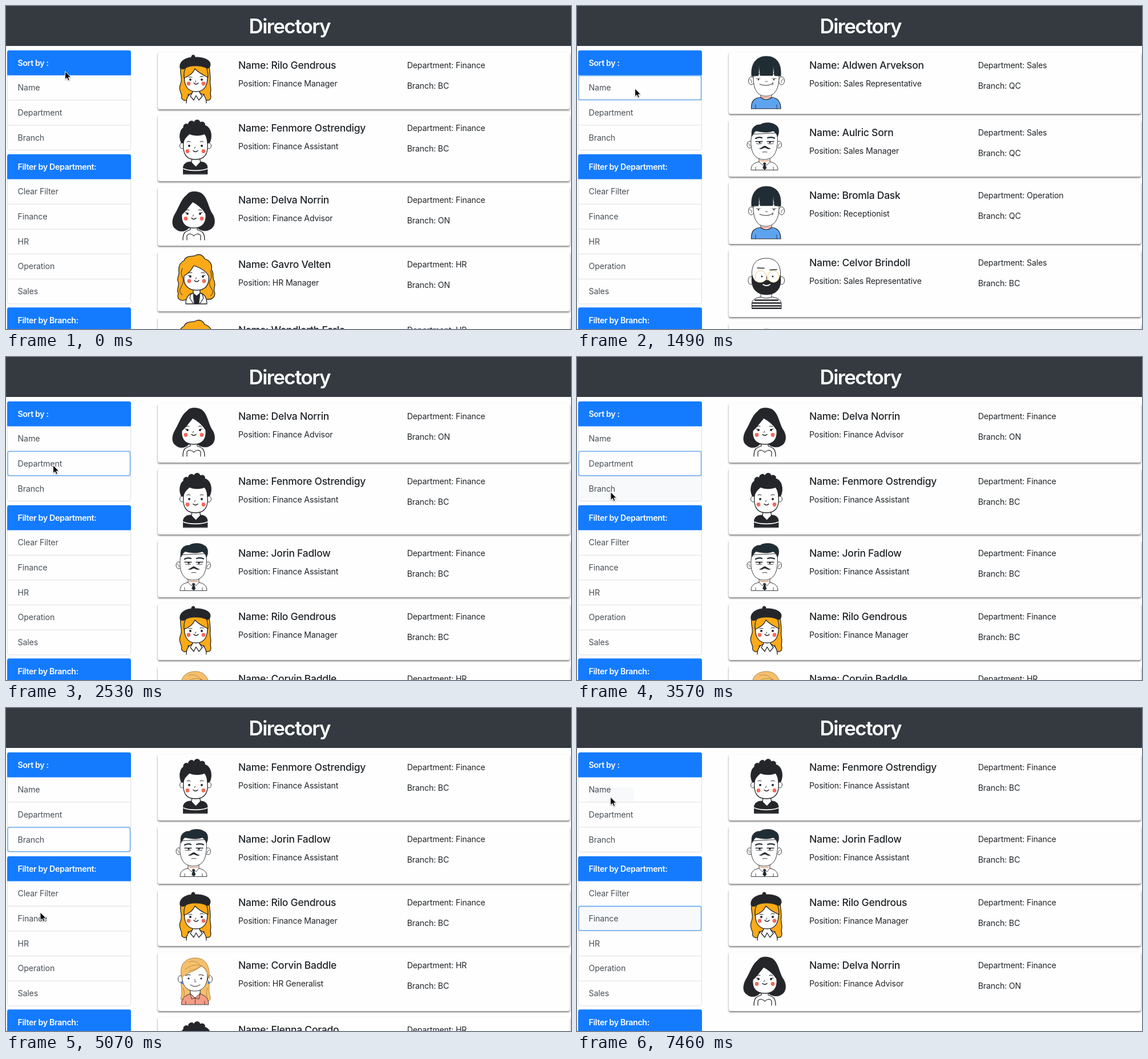
Recreate the animation shown at these times as an HTML page. Size 990 by 566 pixels, loop 8 s.

```html
<!DOCTYPE html>
<html lang="en">
<head>
<meta charset="utf-8">
<title>Directory</title>
<style>
html, body { margin: 0; width: 100%; height: 100%; overflow: hidden; background: #fff; }
#stage { position: relative; width: 990px; height: 566px; overflow: hidden; background: #fefefe; }
#stage > svg, .view { position: absolute; left: 0; top: 0; width: 990px; height: 566px; }
.view { visibility: hidden; }
.card { position: absolute; left: 266px; width: 721.5px; border-radius: 3.6px; background: #fefefe;
  box-shadow: 0 2px 3px rgba(0, 0, 0, .5); }
.card svg { position: absolute; left: 24px; top: 0; width: 690px; height: 120px; overflow: visible; }
text { font: 400 14.2px Inter, Roboto, sans-serif; letter-spacing: -.17px; fill: #212529; }
.name { font-size: 17.6px; font-weight: 500; letter-spacing: -.3px; }
.title { font-size: 35px; font-weight: 600; letter-spacing: -1.6px; fill: #fff; }
.item { fill: #495057; }
.head { fill: #fff; font-weight: 600; letter-spacing: -.33px; }
</style>
</head>
<body>
<div id="stage">
  <div id="views"></div>
  <svg id="chrome" viewBox="0 0 990 566"></svg>
</div>
<script>
const INK = '#25262a', SLATE = '#212d34', GOLD = '#fcaa17', BLUSH = '#f26b5c';
const shape = (d, fill = '#fff', width = 1.3, stroke = INK) =>
  `<path d="${d}" fill="${fill}" stroke="${stroke}" stroke-width="${width}" stroke-linejoin="round" stroke-linecap="round"/>`;
const line = (d, width = 1.2, stroke = INK) => shape(d, 'none', width, stroke);
const dot = (x, y, r, fill = INK) => `<circle cx="${x}" cy="${y}" r="${r}" fill="${fill}"/>`;
const ear = (x, y, rx = 4.5, ry = 6) =>
  `<ellipse cx="${x}" cy="${y}" rx="${rx}" ry="${ry}" fill="#fff" stroke="${INK}" stroke-width=".9"/>`;
const box = (x, y, w, h, fill, more = '') =>
  `<rect x="${x}" y="${y}" width="${w}" height="${h}" fill="${fill}" ${more}/>`;
const label = (x, y, s, cls = '') => `<text x="${x}" y="${y}" class="${cls}">${s}</text>`;

// Round eyes, red cheeks and a small smile around a centre line
const cuteFace = (cx, y, eye, cheek, drop) =>
  dot(cx - eye, y, 2) + dot(cx + eye, y, 2) +
  dot(cx - cheek, y + drop, 3.4, BLUSH) + dot(cx + cheek, y + drop, 3.4, BLUSH) +
  line(`M${cx - 4} ${y + drop - 1}q4 4 8 0`, 1.4) + line(`M${cx - .5} ${y + 2}l-1 2.5`, 1);
const lashes = (cx, y, eye) =>
  line(`M${cx - eye - 4} ${y - 2}l4 .8M${cx + eye + 4} ${y - 2}l-4 .8`) +
  line(`M${cx - eye - 3} ${y - 6}q3 -2 6 -.5M${cx + eye - 3} ${y - 6.5}q3 -1.5 6 .5`, 1);

// Each portrait: distance to the next card, drawing
const faces = {
  beret: [109.6,
    shape('M16 25C14 40 20 45 16 55C12 64 16 70 18 76C16 81 21 86 25 84C30 86 31 80 29 74H57C56 82 59 86 62 84C69 85 70 80 68 72C71 62 66 56 68 48C68 40 67 32 66 25Z', GOLD) +
    shape('M26 89C26 80 29 74 37 71V64H49V71C58 74 61 80 61 89') +
    shape('M37 70L33 77L39 84L43 76L48 84L54 77L49 70') +
    shape('M23 40C21 58 28 69 43 69C58 69 64 58 63 40L58 25H28Z') +
    shape('M22 45C21 34 24 25 30 23H58C64 28 64 38 64 44C55 40 47 35 41 29C38 36 31 42 22 45Z', GOLD) +
    shape('M15 27C13 16 24 10 35 9C34 4 42 3 41 9C54 8 69 13 68 22C68 26 65 29 62 28C52 23 34 22 24 28C20 31 16 30 15 27Z', INK, .8) +
    line('M30 44q3 -1.5 6 0M50 43q3 -1.5 6 0', 1) +
    cuteFace(43, 48, 10, 13, 7)],
  quiff: [126.2,
    shape('M19 52C12 42 14 26 21 22C20 15 28 14 29 17C30 9 38 9 39 13C42 6 50 8 50 13C56 10 60 15 58 18C68 20 72 34 68 46L64 54Z', INK, .8) +
    ear(18.5, 54, 4, 5) + ear(65.5, 54, 4, 5) +
    shape('M36 74L35 84L43 92L51 84L49 74Z') +
    shape('M21 48C22 40 27 38 31 33C38 36 50 37 58 33C62 38 63 44 63 50C65 70 56 78 42 78C27 78 19 70 21 48Z') +
    shape('M20.5 103.5V92C21 85 27 82 34 82L42.5 91L51 82C58 82 63 86 63 92V103.5Z', INK, .8) +
    line('M21 94C30 98.5 53 98.5 63 94', 1.6, '#fff') +
    line('M27 47q3 -2 6 0M50 47q3 -2 6 0', 1) +
    cuteFace(42, 54, 11, 14, 9.5)],
  bob: [113.6,
    shape('M27 14C30 8 42 6 52 11C62 17 64 34 70 45C78 55 77 70 68 74C60 80 48 75 46 72H30C26 78 14 80 8 74C0 70 0 57 7 46C14 34 18 20 27 14Z', INK, .8) +
    shape('M20 93C20 80 24 78 33 75V66H45V75C54 78 58 80 58 93') +
    line('M27 93V85C30 81 36 82 39 86C42 82 48 81 51 85V93') +
    shape('M18 48C25 42 30 34 37 26C45 30 55 38 60 47C62 64 53 72 39 72C25 72 16 64 18 48Z') +
    lashes(39, 47, 11) + cuteFace(39, 47, 11, 14, 8.5)],
  curls: [115,
    shape('M22 16C26 6 38 10 42 7C50 3 56 8 58 13C68 16 72 24 70 32C75 38 71 44 74 50C79 58 73 64 75 70C78 78 72 84 66 84L24 85C14 88 9 82 12 74C8 68 14 60 12 54C8 48 14 42 13 36C12 28 14 20 22 16Z', GOLD) +
    line('M19 30q-4 8 0 15t-2 17t2 14M68 34q4 9 0 16t2 15t-2 13', 1) +
    shape('M25 92C25 82 29 75 38 73V64H50V73C59 75 62 82 62 92Z') +
    shape('M38 73L44 78L50 73L48 92H40Z', INK, .8) + line('M34 75L32 82L38 91M54 75L56 82L50 91') +
    shape('M22 43C29 39 35 33 39 25C49 28 60 34 65 43C67 59 59 68 44 68C29 68 20 59 22 43Z') +
    lashes(44, 44, 11) + cuteFace(44, 44, 11, 13, 8)],
  bowl: [117.6,
    ear(15.5, 50, 5, 7) + ear(68.5, 50, 5, 7) + line('M13 48q4 0 3 5M71 48q-4 0 -3 5', .8) +
    box(32, 72, 19, 12, '#fff', `stroke="${INK}" stroke-width=".9"`) +
    shape('M15.5 99C15 86 20 80 32 79C37 84 46 84 51 79C62 80 67 87 67 99Z', '#5ea3f0', 1.2) +
    line('M23 99V92M60 99V92', .8) +
    shape('M19 38C18 62 24 77 41 77C58 77 65 62 64 38Z', '#fff', .9) +
    line('M33 78.5Q42 80.5 50 78.5', 1.6, '#e9785f') +
    shape('M16 42C14 20 24 7 42 7C60 7 69 20 67 42L56 41L54 24L53 41H31L29 24L28 41Z', SLATE, .6) +
    dot(28, 48, 1.3) + dot(55, 48, 1.3) + line('M24 46h7M52 46h7', .8) +
    line('M40 51q2 2 4 0', .8) + line('M30 56Q42 61 53 55M53 53v4', 1)],
  tache: [110.7,
    ear(12.5, 44) + ear(64, 44) + line('M10 42q4 1 3 5M66 42q-4 1 -3 5', .8) +
    shape('M15 88C15 80 19 76 29 74V66H48V74C57 76 62 80 62 88Z', '#fff', .9) +
    shape('M16 26C12 52 18 70 38 70C58 70 63 52 61 24Z', '#fff', .9) +
    line('M31 71.5Q39 74 46 71.5', 1.5, '#e39a6d') +
    line('M29 74L35 80L38.5 75L43 80L48 74M23 88V83M54 88V83', .8) +
    shape('M36.5 76H41L40 79L42 85L39 88L35.5 85L37.5 79Z', SLATE, .6) +
    shape('M17 29C13 16 22 8 31 9C38 4 52 5 57 9C65 12 65 24 61 30C60 25 57 22 54 20C44 24 32 22 24 20C20 22 19 26 17 29Z', SLATE, .6) +
    line('M23 33Q29 30 34 32M44 32Q50 30 56 32.5', 2.2, SLATE) +
    line('M23 38.5H35M43 38.5H55', 1.3) + dot(30, 40, 1.7) + dot(48, 40, 1.7) +
    line('M24 42q5 2 10 0M44 42q5 2 10 0', .8) +
    shape('M30 51C33 50 36 47 39 46C42 47 45 50 49 51C45 52.5 42 50 39 49C36 50 33 52.5 30 51Z', SLATE, .6) +
    line('M35 57q4 -1 8 0', .9)],
  beard: [128.6,
    ear(14.5, 54, 4.5, 7) + ear(69, 54, 4.5, 7) +
    box(32, 74, 19, 12, '#fff', `stroke="${INK}" stroke-width=".9"`) +
    shape('M16.5 103V94C17 87 24 84 32 83Q42 87 52 83C60 84 67 87 68 94V103Z', '#fff', 1) +
    line('M22 88.5H62M18 93.5H66.5M17.5 98.5H67M17.5 102.7H67', 2.3) +
    shape('M17 50C14 28 22 15 42 15C60 15 69 28 66 50L60 70H24Z', '#fff', .9) +
    shape('M17 45C20 56 26 58 32 58C38 52 48 52 54 58C60 57 64 54 66 45C70 64 62 79 42 79C22 79 13 64 17 45Z', INK, .6) +
    line('M36 61q6 4 12 0', 1.8, '#fff') +
    line('M26 32L38 32.5M48 35.5L60 35', 1.6) +
    shape('M22 47a10 10 0 1 0 20 0a10 10 0 1 0 -20 0ZM44 47a10 10 0 1 0 20 0a10 10 0 1 0 -20 0Z', '#fff', 1.1, '#f2d49c') +
    dot(34, 47, 1.4) + dot(53, 47, 1.4) + line('M42 47q2 7 -1 9', .9)],
  blonde: [113,
    shape('M18 30C14 60 21 70 16 80C18 88 27 90 32 84H54C60 90 70 86 68 78C63 66 69 50 64 30Z', '#f5bf6c', .9, '#a8793a') +
    ear(15.5, 47, 4, 6) + ear(67.5, 47, 4, 6) +
    shape('M17.5 91.5C17 81 23 76 33 73V64H50V73C60 76 65 81 65 91.5Z', '#f39c86', .9) +
    shape('M33 72V64H50V72L41.5 80Z', '#fff', .9) +
    line('M33 73L35 82L41.5 80L48 82L50 73M41.5 80V91M25 91V86M58 91V86', .8) +
    line('M20 62q5 10 0 22M63 62q-4 10 1 22', .8, '#a8793a') +
    shape('M19 34C16 54 24 68 41 68C58 68 64 54 63 34L52 20Z', '#fff', .9) +
    shape('M18 44C12 20 26 10 42 10C58 10 68 22 66 46C62 34 58 27 52 24C44 33 28 35 18 44Z', '#f5bf6c', .9, '#a8793a') +
    line('M52 24Q40 18 24 30M52 24Q42 12 30 17M52 24Q46 29 30 33M52 24Q60 26 63 34', .7, '#a8793a') +
    line('M25 41q4 -3 8 -1M48 40q4 -2 8 1', 1.1) + dot(30, 46, 1.6) + dot(52, 46, 1.6) +
    line('M41 47v5h2', .8) + line('M33 57q8 6 17 0', 1) +
    dot(18.5, 53.5, 2.1, '#3f7fd0') + dot(65.5, 53.5, 2.1, '#3f7fd0')]
};

// face, name, position, department, branch
const staff = {
  rilo: ['beret', 'Rilo Gendrous', 'Finance Manager', 'Finance', 'BC'],
  fen: ['quiff', 'Fenmore Ostrendigy', 'Finance Assistant', 'Finance', 'BC'],
  delva: ['bob', 'Delva Norrin', 'Finance Advisor', 'Finance', 'ON'],
  gavro: ['curls', 'Gavro Velten', 'HR Manager', 'HR', 'ON'],
  wend: ['curls', 'Wendlorth Farlo', 'HR Generalist', 'HR', 'ON'],
  aldwen: ['bowl', 'Aldwen Arvekson', 'Sales Representative', 'Sales', 'QC'],
  aulric: ['tache', 'Aulric Sorn', 'Sales Manager', 'Sales', 'QC'],
  bromla: ['bowl', 'Bromla Dask', 'Receptionist', 'Operation', 'QC'],
  celvor: ['beard', 'Celvor Brindoll', 'Sales Representative', 'Sales', 'BC'],
  jorin: ['tache', 'Jorin Fadlow', 'Finance Assistant', 'Finance', 'BC'],
  corvin: ['blonde', 'Corvin Baddle', 'HR Generalist', 'HR', 'BC'],
  flenna: ['quiff', 'Flenna Corado', 'HR Assistant', 'HR', 'BC']
};
const lists = [
  'rilo fen delva gavro wend',
  'aldwen aulric bromla celvor corvin',
  'delva fen jorin rilo corvin',
  'fen jorin rilo corvin flenna',
  'fen jorin rilo delva'
];

function buildView(list) {
  let top = 81;
  const cards = list.split(' ').map(id => {
    const [face, name, job, dept, branch] = staff[id];
    const [pitch, art] = faces[face];
    const html = `<div class="card" style="top:${top}px;height:${pitch - 10}px"><svg viewBox="0 0 690 120">${art}` +
      label(117, 29.3, 'Name: ' + name, 'name') + label(117, 60, 'Position: ' + job) +
      label(412.7, 28.2, 'Department: ' + dept) + label(412.7, 63.8, 'Branch: ' + branch) + '</svg></div>';
    top += pitch;
    return html;
  });
  return `<div class="view">${cards.join('')}</div>`;
}

function buildGroup(y, title, items) {
  const row = 43.7, h = row * (items.length + 1);
  let s = `<path d="M2 ${y + row}V${y + 3.6}q0 -3.6 3.6 -3.6H215.4q3.6 0 3.6 3.6V${y + row}Z" fill="#147bff"/>` +
    label(20.4, y + 27.3, title, 'head');
  items.forEach((item, i) => {
    const top = y + row * (i + 1);
    if (i) s += box(2.5, top - .5, 216, 1, '#dfdfdf');
    s += label(20.6, top + 26.7, item, 'item');
  });
  return s + `<path d="M2.5 ${y + row}V${y + h - 3.6}q0 3.6 3.6 3.6H214.9q3.6 0 3.6 -3.6V${y + row}" fill="none" stroke="#dfdfdf"/>`;
}

const $ = id => document.getElementById(id);
$('views').innerHTML = lists.map(buildView).join('');
$('chrome').innerHTML =
  box(0, 0, 990, 70, '#343a40') +
  '<text x="496.8" y="48" class="title" text-anchor="middle">Directory</text>' +
  '<g id="hover"></g>' +
  buildGroup(77.7, 'Sort by :', ['Name', 'Department', 'Branch']) +
  buildGroup(259.8, 'Filter by Department:', ['Clear Filter', 'Finance', 'HR', 'Operation', 'Sales']) +
  buildGroup(528.2, 'Filter by Branch:', []) +
  box(3, 0, 214.6, 42.4, 'none', 'id="focus" rx="3" stroke="#7db6f5" stroke-width="1.8"') +
  '<path id="cursor" d="M0 0V14.4L3.3 11.3L5.5 16.2L7.9 15.1L5.8 10.4H10.3Z" fill="#0a0a0a" stroke="#fff" stroke-width="1" style="filter:drop-shadow(0 1px 1px rgba(0,0,0,.3))"/>';

// Tables of steps, each starting with its time in ms
const cursorSteps = [
  [0, 103.5, 114.5], [140, 112, 163], [290, 103, 162.5], [1040, 103, 146], [1190, 101.5, 144.5],
  [1790, 101, 149], [1930, 84, 188], [2080, 82.5, 189.5], [3270, 79, 196], [3420, 61, 227.5],
  [3570, 59, 236.5], [4920, 58, 310], [5070, 60, 358], [5210, 55.3, 377], [7010, 58, 271],
  [7160, 60, 173], [7310, 58, 163], [7460, 58.7, 156]
];
// time, list, top of the focused row
const viewSteps = [[0, 0, -99], [1490, 1, 122], [2530, 2, 165.4], [3870, 3, 209.2], [5810, 4, 347.5]];
// start, end, box
const hovers = [
  [140, 1490, 22, 126, 102, 38], [1930, 2530, 3, 165, 215, 43], [3420, 3870, 3, 209, 215, 43],
  [7010, 8000, 3, 347, 215, 43], [7460, 8000, 22, 139, 78, 25]
];
const at = (steps, t) => steps.reduce((last, s) => s[0] <= t ? s : last);
const views = [...document.querySelectorAll('.view')];
$('hover').innerHTML = hovers.map(h => box(...h.slice(2), '#f8f9fb')).join('');
const patches = [...$('hover').children];

function draw(t) {
  const [, x, y] = at(cursorSteps, t), [, view, focus] = at(viewSteps, t);
  $('cursor').setAttribute('transform', `translate(${x} ${y})`);
  $('focus').setAttribute('y', focus);
  views.forEach((v, i) => v.style.visibility = i === view ? 'visible' : 'hidden');
  patches.forEach((p, i) => p.style.visibility = t >= hovers[i][0] && t < hovers[i][1] ? 'visible' : 'hidden');
}
const start = performance.now();
function tick() {
  draw((performance.now() - start) % 8000);
  requestAnimationFrame(tick);
}
tick();
</script>
</body>
</html>
```
